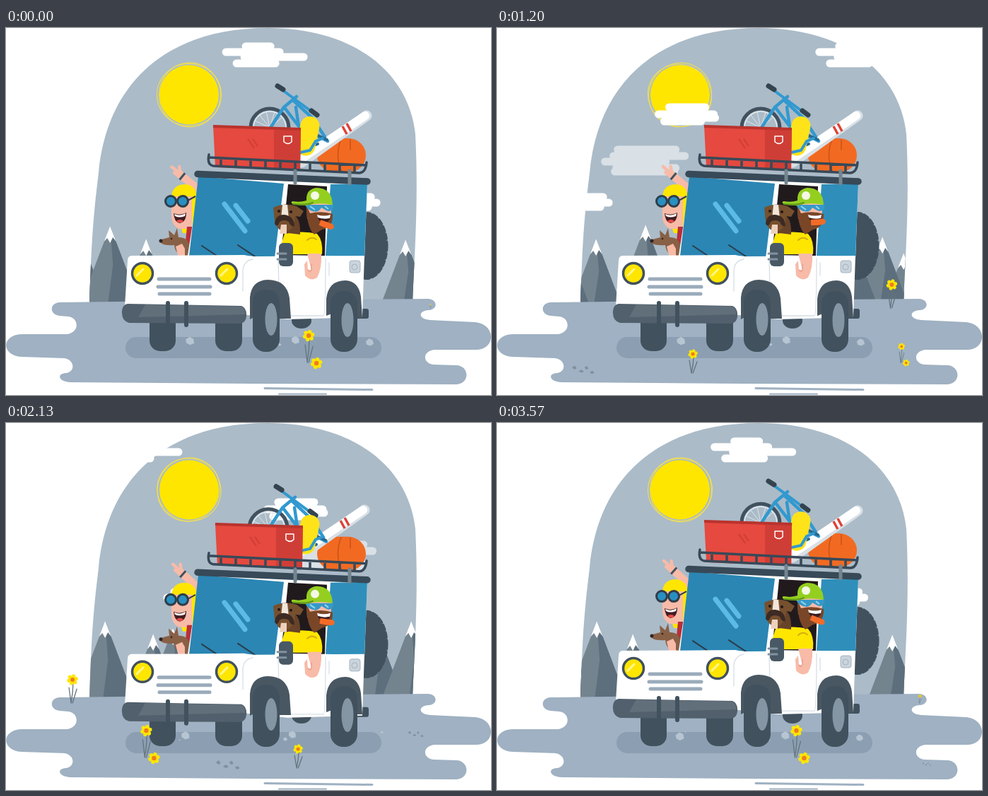
These frames come from a looping animation (686 px wide and 519 px high, 3600 ms). An HTML page:

```html
<!DOCTYPE html>
<html lang="en">
<head>
<meta charset="utf-8">
<title>Road trip</title>
<style>
  html, body { margin: 0; width: 100%; height: 100%; overflow: hidden; background: #fff; }
  svg { display: block; width: 686px; height: 519px; }
  .line { fill: none; stroke-linecap: round; stroke-linejoin: round; }
  .dark { fill: #41515e; }
  .skin { fill: #f7bba8; }
  .yellow { fill: #ffe600; }
</style>
</head>
<body>
<svg viewBox="0 0 686 519">
  <defs>
    <path id="dome" d="M118 390C121 300 123 270 131 205C143 75 230 0 370 0C495 0 570 65 579 150C584 250 577 330 575 390Z"/>
    <clipPath id="inDome"><use href="#dome"/></clipPath>
    <clipPath id="leftHalf"><path d="M0 0H380V390H0Z"/></clipPath>
    <clipPath id="rightHalf"><path d="M380 0H686V390H380Z"/></clipPath>
  </defs>

  <use href="#dome" fill="#abbbc8"/>
  <circle cx="259" cy="94.5" r="42" class="yellow"/>
  <g id="rays" class="line" stroke="#f5e04a" stroke-width="1">
    <ellipse rx="45.5" ry="44"/><ellipse cx="1" rx="43.5" ry="45.5"/>
  </g>
  <g id="clouds" class="line" stroke="#fff" stroke-width="11"></g>
  <g clip-path="url(#inDome)">
    <g id="leftPeaks" clip-path="url(#leftHalf)"></g>
    <g id="rightPeaks" clip-path="url(#rightHalf)"></g>
  </g>

  <path fill="#9fb1c2" d="M76 388L330 385L597 383C611 384 611 398 598 399C582 400 583 412 600 413L664 416C693 419 693 454 666 455L606 455C588 457 589 475 606 476L638 477C656 479 656 503 637 504L350 503L92 501C73 500 72 489 84 488C98 487 98 470 83 467L22 465C-7 463-7 434 22 433L86 433C104 431 104 410 88 408L76 407C61 405 61 389 76 388Z"/>
  <g class="line" stroke="#9fb1c2">
    <path d="M366 509.500L518 511.500" stroke-width="3"/><path d="M386 517.500H453" stroke-width="2"/>
  </g>
  <g id="backFlowers"></g>
  <g id="rocks" fill="#7f909f"></g>
  <rect x="169" y="437" width="362" height="30" rx="15" fill="#8c9fb2"/>
  <g id="dust" fill="#b6c5d1"></g>

  <g class="dark">
    <rect x="203" y="395" width="37" height="62" rx="15"/>
    <rect x="296" y="395" width="38" height="62" rx="15"/>
    <ellipse cx="418" cy="414" rx="14" ry="11"/>
  </g>

  <g id="car">
    <ellipse cx="510" cy="308" rx="28" ry="46" class="dark"/>
    <ellipse cx="510" cy="308" rx="28.500" ry="46" class="line" stroke="#41515e" stroke-width="4" stroke-dasharray="7 4"/>
    <path d="M496 397h14q3 0 3 3v8q0 3-3 3h-14z" class="dark"/>

    <g id="ball">
      <rect x="440" y="156" width="69" height="48" rx="25" fill="#f26a21"/>
      <path d="M474 157Q465 180 474 202M487 158v14" class="line" stroke="#c9521a" stroke-width="1.500"/>
    </g>
    <g id="skis">
      <path d="M418 190L510 124" class="line" stroke="#d8e0e6" stroke-width="15"/>
      <path d="M416 186L508 124" class="line" stroke="#fff" stroke-width="12"/>
      <path d="M476 139l6 11M482 135l6 11" stroke="#dd4238" stroke-width="3.500"/>
    </g>
    <g id="bike">
      <circle cx="373" cy="141" r="27" class="line" stroke="#41515e" stroke-width="5"/>
      <circle cx="373" cy="141" r="23" class="line" stroke="#e4ebf0" stroke-width="1.500"/>
      <path d="M373 141L352 131M373 141L358 122M373 141L368 118M373 141L380 119M373 141L391 126" stroke="#dce5eb"/>
      <g class="line" stroke="#3299cf" stroke-width="4.500">
        <path d="M374 141L393 112L411 97M395 114L414 139L455 160M407 103L434 128L451 154M414 139L410 112"/>
        <path d="M390 87L432 118" stroke-width="4"/>
      </g>
      <path d="M384 82l8 5M432 117l8 6" class="line" stroke="#34444f" stroke-width="7"/>
      <path d="M439 151l15 7M428 169l13-5" class="line" stroke="#28698d" stroke-width="4"/>
    </g>
    <rect x="414" y="125" width="27" height="56" rx="13" fill="#ffe31a" transform="rotate(12 428 150)"/>
    <path d="M416 176l14-3 8-13 10-4" class="line" stroke="#3299cf" stroke-width="4"/>
    <g id="box">
      <path d="M293 138L417 142L416 202L296 197Z" fill="#e5493f"/>
      <path d="M379 141L417 142L416 202L379 200Z" fill="#cf3e36"/>
      <path d="M293 139L417 143" stroke="#b9332d" stroke-width="4"/>
      <path d="M342 157l9 13M349 157l7 10" stroke="#cf3e36" stroke-width="2"/>
      <path d="M393 153h11v8q-5 5-11 0z" class="line" stroke="#fff" stroke-width="1.500"/>
    </g>
    <path id="rack" class="line" stroke="#384958" stroke-width="3.500"/>

    <!-- passenger on the far side -->
    <g id="arm">
      <path d="M8 0L-29 0" class="line" stroke="#f7bba8" stroke-width="11"/>
      <path d="M-30-1L-44-1M-30-3L-36-8M-32 3L-36 3" class="line" stroke="#f7bba8" stroke-width="4.500"/>
      <path d="M-24-6v12" stroke="#41515e" stroke-width="3"/>
    </g>
    <path d="M234 239Q235 222 252 221Q267 221 270 237V290H250Z" class="yellow"/>
    <path d="M234 238L263 238V284H244Q234 278 234 266Z" class="skin"/>
    <path d="M237 262Q246 266 255 261Q255 275 245 276Q238 274 237 262Z" fill="#421d22"/>
    <path d="M238 263Q246 267 254 262l-1 4Q245 269 239 266Z" fill="#fff"/>
    <path d="M241 273q5-4 10 0-4 5-10 0z" fill="#e84c45"/>
    <g fill="#298fc0" stroke="#2f3d48" stroke-width="3">
      <circle cx="233" cy="245" r="7.500"/><circle cx="250" cy="245" r="7.500"/>
    </g>
    <path d="M257 244L268 238" stroke="#2f3d48" stroke-width="2"/>
    <path d="M256 281h16v42h-20z" fill="#b92f37"/>
    <path d="M258 322Q240 324 238 307Q224 308 219 304Q216 300 220 299L231 296L230 286L238 293L242 283L244 296Q259 296 260 310Z" fill="#886046"/>
    <circle cx="219" cy="301" r="2.500" fill="#2e2523"/><circle cx="234" cy="298" r="1.300" fill="#2e2523"/>
    <path d="M240 309l9-4 4 7v13h-9z" class="skin"/>

    <!-- cabin -->
    <path d="M274 210L511 220L507 326L257 322Z" fill="#fff"/>
    <path d="M272 210L393 220L380 325L259 322Z" fill="#2b86b3"/>
    <path d="M459 221L511 220L507 324L452 322Z" fill="#2f8fba"/>
    <path d="M399 221L454 224L451 322L389 321Z" fill="#211a1d"/>
    <path d="M309 249L338 287M325 251L342 273" class="line" stroke="#5cbbe6" stroke-width="7"/>
    <path d="M277 308L298 322M328 307L352 323" class="line" stroke="#2b3c49" stroke-width="2"/>
    <path d="M271 206.500L511 217" class="line" stroke="#384958" stroke-width="9.500"/>
    <path d="M409 202v17M486 202v18" class="line" stroke="#74858f" stroke-width="5"/>

    <!-- driver and dog -->
    <path d="M389 307L394 291Q420 286 440 291Q449 301 447 320H390Z" class="yellow"/>
    <path d="M391 289Q388 270 404 263Q417 266 416 292Z" fill="#674329"/>
    <path d="M378 254Q394 246 411 252L421 259L416 267L409 266Q408 288 393 287Q380 286 379 264Z" fill="#77502f"/>
    <path d="M391 250h7l2 20h-11z" fill="#f2e6da"/>
    <path d="M380 277Q381 264 393 264Q407 265 408 280Q403 282 400 274Q393 270 387 274Q384 283 380 277Z" fill="#3c2a23"/>
    <g fill="#1d1717"><circle cx="386" cy="259" r="2"/><circle cx="403" cy="260" r="2"/></g>
    <path d="M389 278h8v13h-10z" fill="#efd0bd"/>
    <path d="M425 247H461L459 270H426Z" class="skin"/>
    <path d="M425 251L430 262Q447 258 462 263Q463 282 447 285L436 292Q425 282 425 251Z" fill="#7a4628"/>
    <path d="M440 264Q449 268 459 264Q459 276 448 275Q441 273 440 264Z" fill="#3a1b1d"/>
    <path d="M440 264Q450 267 459 264l-1 5Q449 271 441 268Z" fill="#fff"/>
    <g id="tongue"><path d="M0-4Q9-4 18-4Q24 0 18 4Q9 5 0 4Z" fill="#f46b28"/></g>
    <path d="M423 250H463V254Q460 261 453 258L446 254Q442 262 433 259Q426 257 423 250Z" fill="#3798c8"/>
    <path d="M430 252l7 5M451 252l5 4" stroke="#8dd5ef" stroke-width="2"/>
    <path d="M406 245Q416 247 425 244Q424 228 439 226Q461 226 462 250Q440 246 426 251Q411 251 404 248Q403 245 406 245Z" fill="#94cf20"/>
    <path d="M406 249Q426 251 434 247" class="line" stroke="#5f961b" stroke-width="2"/>
    <circle cx="437" cy="237" r="6" fill="#f4f8e5"/>
    <path d="M426 300Q432 294 439 299" class="line" stroke="#d5ad10" stroke-width="2"/>

    <!-- bodywork -->
    <path d="M177 322L337 321Q348 323 354 323L507 322L504 409L398 412L342 406L168 394L172 329Q172 323 177 322Z" fill="#fff"/>
    <path d="M335 372V343Q336 329 349 327M385 326L386 372Q397 376 397 407M402 407H449Q452 406 452 326M457 350V332" class="line" stroke="#d6dfe6" stroke-width="1.300"/>
    <path d="M426 319H446Q447 340 440 353Q431 359 423 350L422 334L426 329L427 342L432 342Z" class="skin"/>
    <path d="M427 342q3 5 5 0v-8" class="line" stroke="#e99b8a" stroke-width="1.300"/>
    <rect x="386" y="304" width="20" height="33" rx="6" fill="#485965"/>
    <path d="M384 319h12M384 327h12" class="line" stroke="#8292a0" stroke-width="3"/>
    <g fill="#cad4dc" stroke="#a5b3bf"><rect x="486" y="329" width="15" height="17" rx="3"/><circle cx="493" cy="338" r="4"/></g>
    <g class="yellow" stroke="#41515e" stroke-width="3.500">
      <circle cx="193" cy="347" r="14.500"/><circle cx="312" cy="347" r="14.500"/>
    </g>
    <path d="M185 350l9-9M304 350l9-9" class="line" stroke="#fff48b" stroke-width="3"/>
    <path d="M216 355H288M215 366H289M217 376H288" class="line" stroke="#9aabba" stroke-width="5"/>
    <path d="M172 390L333 393Q341 396 340 408Q339 417 331 418L174 417Q163 414 164 400Q165 391 172 390Z" fill="#51606c"/>
    <path d="M197 391L333 394Q339 398 338 405L187 409Z" fill="#697681" opacity=".7"/>
    <path d="M229 389V420M255 389V420" class="line" stroke="#41515e" stroke-width="6"/>
  </g>

  <g id="fenders" fill="#495762">
    <path d="M345 412V381Q347 357 370 356Q397 356 401 382L403 411H386V391Z"/>
    <path d="M453 407V383Q456 357 480 357Q499 358 502 380L504 410H492V392Z"/>
  </g>
  <g class="dark">
    <rect x="349" y="370" width="38" height="88" rx="18"/>
    <rect x="459" y="372" width="38" height="86" rx="18"/>
  </g>
  <g fill="#8495a4">
    <ellipse cx="375" cy="412" rx="8.500" ry="23"/><ellipse cx="483" cy="413" rx="8.500" ry="24"/>
  </g>
  <g id="frontFlowers"></g>
</svg>

<script>
const LOOP = 3600;
const $ = id => document.getElementById(id);
const wrap = (v, min, span) => ((v - min) % span + span) % span + min;
const clamp = v => Math.max(0, Math.min(1, v));

function add(parent, markup) {
  const g = document.createElementNS("http://www.w3.org/2000/svg", "g");
  g.innerHTML = markup;
  return $(parent).appendChild(g);
}
function place(el, x, y, more = "") {
  el.setAttribute("transform", `translate(${x.toFixed(2)} ${y.toFixed(2)}) ${more}`);
}
// Interpolates between [time, value] pairs.
function key(points, t, ease = p => p) {
  let i = 1;
  while (i < points.length - 1 && t > points[i][0]) i++;
  const [t0, a] = points[i - 1], [t1, b] = points[i];
  return a + (b - a) * ease(clamp((t - t0) / (t1 - t0)));
}
const smooth = p => p * p * (3 - 2 * p);

// Roof rack
let rack = "M287 179Q284 193 293 195L500 205Q509 204 510 190M287 183L509 194";
for (let i = 0; i < 10; i++) rack += `M${304 + i * 21} ${184 + i * 1.05}v11`;
$("rack").setAttribute("d", rack);

// Clouds: rows of round-ended strokes
const clouds = [
  { d: "M34 5H69M6 13H82M32 20H116M21 29H76", x: 305, y: 21, v: .1206, min: 80, span: 434 },
  { d: "M21 5H72M6 15H84M24 20H86M14 25H66", x: 40, y: 107, v: .152, min: 0, span: 686 },
  { d: "M16 5H70M6 13H78M20 19H66", x: 446, y: 234, v: .1525, min: 60, span: 549 },
  { d: "M24 5H106M18 14H119M6 22H92M22 31H106M20 36H104", x: -180, y: 167, v: .272, min: -180, span: 979, opacity: .55 },
].map(c => ({ ...c, el: add("clouds", `<path d="${c.d}"/>`) }));
clouds.forEach(c => c.el.setAttribute("opacity", c.opacity || 1));

// Mountains: [x at time zero, summit y]
function peaks(parent, list) {
  return list.map(([x, y]) => {
    const h = 390 - y, w = h * .38;
    const el = add(parent, `<path d="M0 0L${-w} ${h}H${w}Z" fill="#74848f"/>
      <path d="M0 0L${w} ${h}H-3L4 ${h * .5}Z" fill="#5d6f7d"/>
      <path d="M0 0L-8.500 22L-4 17L0 24L4 16L8.500 22Z" fill="#fff"/>`);
    return { x, y, el };
  });
}
const mountains = [
  ...peaks("leftPeaks", [[33, 299], [101, 284], [198, 298], [147, 280], [-100, 298], [-30, 278],
    [-190, 290], [-151, 282], [-218, 298], [-286, 280], [-457, 317], [-425, 298]]),
  ...peaks("rightPeaks", [[565, 299], [448, 284], [335, 318], [305, 295], [263, 300],
    [98, 290], [147, 280], [-27, 300]]),
];

// Flowers
function bloom(y, r, x = 0) {
  let petals = "";
  for (let i = 0; i < 6; i++) {
    petals += `<ellipse cy="${-r * .6}" rx="${r * .36}" ry="${r * .45}" transform="rotate(${i * 60 + 15})"/>`;
  }
  return `<g class="yellow" transform="translate(${x} ${y})">${petals}<circle r="${r * .4}" fill="#ef7c22"/></g>`;
}
function stems(h) {
  return `<path d="M1 ${-h}Q1 ${-h / 2} -2 0M-5 ${-h * .66}L-2 0M6 ${-h * .6}L0 0" class="line" stroke="#64747f" stroke-width="1.300"/>`;
}
const line = (x, v, t0) => t => x + v * (t - t0);
const pairPath = [[1380, 81], [3600, 428], [4110, 488], [4800, 572], [4920, 587]];
const flowers = [
  { layer: "backFlowers", h: 33, r: 7.5, y: 396, x: line(110, .092, 510), from: 200, to: 1300 },
  { layer: "backFlowers", h: 33, r: 7.5, y: 396, x: line(508, .073, 510), from: 100, to: 1760 },
  { layer: "backFlowers", h: 33, r: 7.5, y: 396, x: line(94, .085, 2130), from: 1930, to: 3300 },
  { layer: "backFlowers", h: 33, r: 7.5, y: 396, x: line(555, .0755, 3000), from: 2200, to: 3630 },
  { layer: "frontFlowers", h: 27, r: 6.5, y: 488, x: line(176, .1463, 510), from: 300, to: 3450 },
  { layer: "frontFlowers", h: 38, r: 8, y: 473, x: t => key(pairPath, t), from: 1380, to: 4920, pair: true },
].map(f => ({ ...f, el: add(f.layer, stems(f.h) + bloom(-f.h, f.r) + (f.pair ? bloom(1, f.r, 11) : "")) }));

// Pebbles and dust
const pebble = "<path d='M-13-2l4-3 3 4-3 2zM-3 4l4-3 4 3-3 2zM6-3l4-1 2 4-4 1zM14 5l4-2 3 3-4 2z'/>";
const nearRocks = add("rocks", pebble), farRocks = add("rocks", pebble);
const farPath = [[400, 93], [510, 124], [2130, 577], [3000, 650], [3200, 667]];
const puffs = [[236, 0], [244, .5], [384, .1], [390, .6], [503, .35]].map(([x, phase]) =>
  ({ x, phase, el: add("dust", "<path d='M-6 1L-3-5L3-5L7 0L3 5L-3 5Z'/>") }));

const armKeys = [[0, 39], [510, 22], [1200, 40], [1560, 32], [2130, 42], [3000, 65], [3570, 42], [3600, 39]];
const tongueKeys = [[0, 20], [510, 2], [1200, -4], [1560, 32], [2130, 8], [3000, 48], [3570, 22], [3600, 20]];

function draw(t) {
  const bounce = (1 - Math.cos(t / 600 * 2 * Math.PI)) / 2;
  place($("car"), 0, 5 * bounce);
  place($("fenders"), 0, 2 * bounce);
  place($("bike"), -2 * bounce, 3 * bounce);
  place($("box"), 3 * bounce, -bounce);
  place($("skis"), -3 * bounce, -6 * bounce);
  place($("arm"), 268, 225, `rotate(${key(armKeys, t, smooth)})`);
  place($("tongue"), 444, 275, `rotate(${key(tongueKeys, t, smooth)})`);
  place($("rays"), 259, 94.5, `rotate(${t / LOOP * 360})`);

  for (const c of clouds) place(c.el, wrap(c.x + c.v * t, c.min, c.span), c.y);
  for (const m of mountains) place(m.el, wrap(m.x + .2 * t, 0, 720), m.y);

  for (const f of flowers) {
    const time = t < f.from && f.to > LOOP ? t + LOOP : t;
    const size = clamp(Math.min((time - f.from) / 170, (f.to - time) / 200));
    place(f.el, f.x(time), f.y, `scale(${size})`);
  }
  const fade = (from, to) => clamp(Math.min((t - from) / 130, (to - t) / 160));
  place(nearRocks, 118 + .206 * (t - 1200), 482, `scale(${fade(1080, 3630)})`);
  place(farRocks, key(farPath, t), 439, `scale(${.65 * fade(400, 3180)})`);

  for (const p of puffs) {
    const life = (t / 600 + p.phase) % 1;
    place(p.el, p.x + 32 * life, 449 - 13 * life, `rotate(${life * 60}) scale(${Math.sin(life * Math.PI)})`);
  }
}

function frame() {
  draw(performance.now() % LOOP);
  requestAnimationFrame(frame);
}
frame();
</script>
</body>
</html>
```
